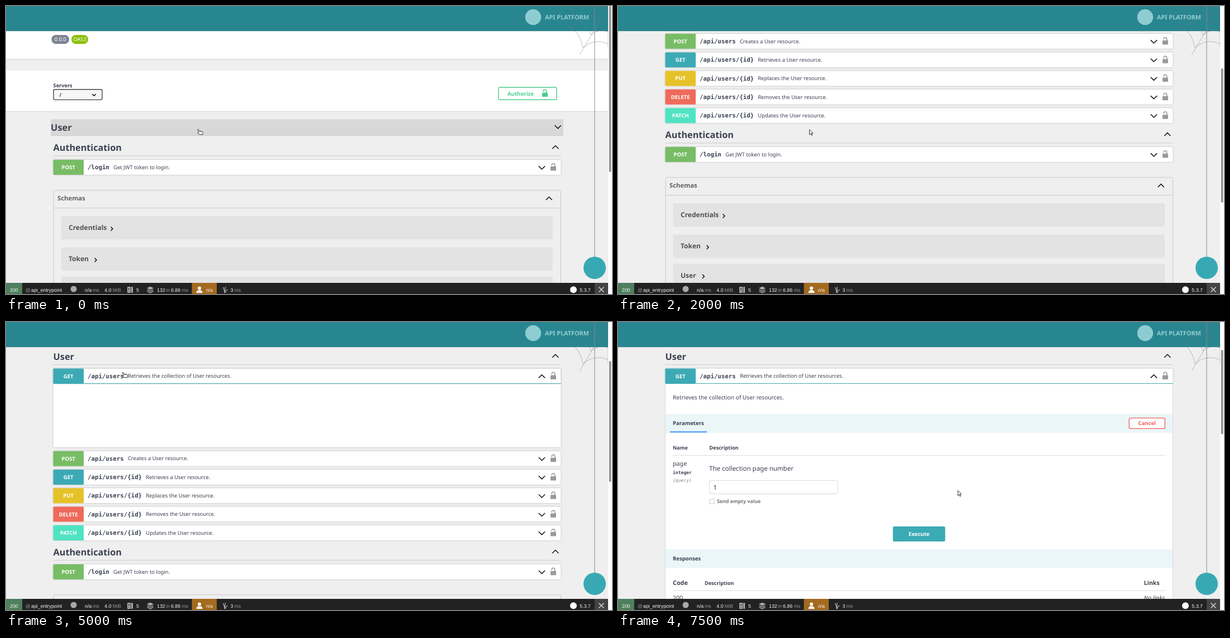
These frames come from a looping animation (1084x517 px, 8000 ms). An HTML page:

```html
<!DOCTYPE html>
<html lang="en">
<head>
<meta charset="utf-8">
<title>API docs</title>
<style>
html, body { margin: 0; width: 100%; height: 100%; overflow: hidden; background: #fff; }
svg { display: block; width: 1084px; height: 517px; }
text { font-family: "Noto Sans", sans-serif; fill: #3b4151; white-space: pre; text-rendering: geometricPrecision; }
.b { font-weight: 700; }
.i { font-style: italic; }
.m { font-family: "DejaVu Sans Mono", monospace; }
.mid { text-anchor: middle; }
#bar text { font-family: "Liberation Sans", Arial, sans-serif; font-size: 8.8px; fill: #f5f5f5; }
#bar .dim { fill: #999; }
.card { fill: #fff; filter: drop-shadow(0 .5px 1px rgba(0,0,0,.3)); }
</style>
</head>
<body>
<svg viewBox="0 0 1084 517">
  <rect width="1077" height="517" fill="#efefef"/>
  <g id="page"></g>
  <rect width="1077" height="45" fill="#288690"/>
  <path d="M0 45.3H1077" stroke="#000" stroke-opacity=".15" stroke-width=".7"/>
  <circle cx="943" cy="20" r="14.2" fill="#8dcdd2"/>
  <text x="964" y="24.4" class="b" font-size="10.8" style="fill:#93d0d4">API PLATFORM</text>
  <g id="web" fill="none" stroke="#6d7577" stroke-opacity=".5" stroke-width=".9"></g>
  <path d="M1053 0V452" stroke="#85898a" stroke-width="1"/>
  <circle cx="1053" cy="470" r="20" fill="#38a9b4"/>
  <rect x="1077" width="7" height="517" fill="#fcfcfc"/>
  <rect id="thumb" x="1078.8" width="3.6" rx="1.8" fill="#8f8f8f"/>
  <g id="bar"></g>
  <g id="cursor" stroke="#222" stroke-width=".9" stroke-linejoin="round" fill="#fff"></g>
</svg>
<script>
const $ = id => document.getElementById(id);
const colors = { GET: '#3caab5', POST: '#78bd65', PUT: '#e6c229', DELETE: '#ef6a5a', PATCH: '#50e3c2' };
const pitch = 33.33;

const text = (x, y, str, size = 9.45, cls = '', fill = '') =>
  `<text x="${x}" y="${y}" font-size="${size}" class="${cls}"${fill && ` style="fill:${fill}"`}>${str}</text>`;
const rect = (x, y, w, h, fill, extra = '') =>
  `<rect x="${x}" y="${y}" width="${w}" height="${h}" fill="${fill}" ${extra}/>`;
const path = (d, stroke, width = 1, fill = 'none') =>
  `<path d="${d}" fill="${fill}" stroke="${stroke}" stroke-width="${width}"/>`;
const hline = (x1, x2, y, stroke, width) => path(`M${x1} ${y}H${x2}`, stroke, width);
const shift = (y, body) => `<g transform="translate(0 ${y})">${body}</g>`;
const outline = (color, width = 1) => `rx="2.6" stroke="${color}" stroke-width="${width}"`;

function chevron(x, y, up, w = 5.6, h = 5.6, width = 1.5) {
  const s = up ? h / 2 : -h / 2;
  return path(`M${x - w} ${y + s}L${x} ${y - s}L${x + w} ${y + s}`, '#111', width);
}

function padlock(x, y, color) {
  return rect(x - 5, y - 1.5, 10, 7.5, color, 'rx="1"') +
    path(`M${x - 2.8} ${y - 3}v-1a2.8 2.8 0 0 1 5.6 0v3`, color, 1.5);
}

const badge = (x, w, str, fill) => rect(x, 52, w, 16, fill, 'rx="8"') +
  text(x + w / 2, 63.3, str, 9.3, 'mid', '#fff');

// Row centred on y = 0
function row(method, url, note, open) {
  const noteX = 146 + url.length * 6.47 + 7.2;
  return `<rect x="84.5" y="-13.5" width="908" height="27" rx="2" class="card"/>` +
    rect(84.5, -13.5, 54.5, 27, colors[method], 'rx="1.5"') +
    text(111.7, 3.5, method, 9.5, 'b mid', '#fff') +
    text(146, 3.6, url, 10.75, 'b m') + text(noteX, 3.2, note) +
    chevron(958.5, .6, open) + padlock(979, 0, '#999');
}

// Heading with its text centred on y = 0
function heading(name, open, hover) {
  const body = (hover ? rect(84.5, -14.5, 908, 29.3, '#d8d8d8') : '') +
    text(84.6, 5.8, name, 16.2, 'b') + hline(84.5, 992.5, 14.6, '#c9cacd', 1) +
    chevron(982.8, -.9, open);
  return hover ? `<g transform="translate(-5.385 0) scale(1.01)">${body}</g>` : body;
}

function intro() {
  return rect(0, 45, 1077, 50, '#fff') + hline(0, 1077, 95.5, '#d2d2d2', 1) +
    badge(81.3, 31.7, '0.0.0', '#7d8492') + badge(117, 30, 'OAS3', '#89bf04') +
    rect(0, 116, 1077, 73, '#fff') + hline(0, 1077, 189.5, '#d4d4d4', 1) +
    text(84.6, 146.4, 'Servers', 9.2, 'b') +
    rect(85, 149.8, 87, 18.6, '#f7f7f7', outline('#41444e', 1.4)) +
    text(95.3, 162.6, '/', 9.4, 'b') + chevron(157.5, 159.7, false, 3.2, 3.2, 1.5) +
    rect(881, 146, 104, 22.3, '#fff', outline('#49cc90', 1.4)) +
    text(897, 160.8, 'Authorize', 9.6, 'b', '#49cc90') + padlock(964, 157, '#49cc90');
}

function schemas() {
  const model = (y, name, arrow) => rect(98.5, y, 879.5, 42, '#e3e3e3', 'rx="2.5"') +
    text(112, y + 25, name, 12, 'b', '#505050') +
    path(`M${arrow - 1.8} ${y + 19.4}l3.4 3.5l-3.4 3.5`, '#111', 1.5);
  return rect(85, 330.8, 907.5, 600, 'none', outline('#c8c8c8')) +
    text(92, 349.2, 'Schemas', 11.3, 'b', '#606060') + chevron(971.3, 345.5, true) +
    hline(85, 992.5, 362.7, '#c8c8c8', 1) +
    model(377.2, 'Credentials', 189.3) + model(433.2, 'Token', 160.4) + model(485.6, 'User', 152.7);
}

function responses() {
  return rect(85, 377.5, 907.5, 33.5, '#eaf6f7') + text(98, 397.8, 'Responses', 9.55, 'b') +
    text(98, 442, 'Code', 10.8, 'b') + text(155, 441.6, 'Description', 9.1, 'b') +
    text(940.7, 442, 'Links', 10.6, 'b') + hline(98, 979, 452, '#d5d8dc', .9) +
    text(98, 468.3, '200', 10.6) + text(940.7, 468.3, 'No links', 10.6, 'i') +
    text(155, 480.8, 'User collection', 11.5);
}

// Opened operation, in stage coordinates
function details(editing) {
  const common = rect(84.5, 111, 908, 420, '#fff') +
    text(98, 139.4, 'Retrieves the collection of User resources.', 10.15) +
    rect(85, 165, 907.5, 34, '#eaf6f7') + text(98, 185.3, 'Parameters', 9.6, 'b') +
    rect(93, 196, 66, 2.6, '#61a9f7') +
    text(98, 228.7, 'Name', 9, 'b') + text(163.3, 228.7, 'Description', 9.1, 'b') +
    hline(98, 979, 239.4, '#d5d8dc', .9) +
    text(98, 258, 'page', 10.7) + text(98, 273, 'integer', 8.05, 'b m') +
    text(98, 286.6, '(query)', 8.05, 'i m', '#808080') +
    text(163, 267.3, 'The collection page number', 11.5);
  const form = editing
    ? rect(914.4, 172.4, 64, 19, '#fff', outline('#f0625b', 1.4)) +
      text(946.3, 185.2, 'Cancel', 9.5, 'b mid', '#f0625b') +
      rect(163.5, 284.5, 229.5, 24, '#fff', outline('#d9d9d9')) + text(170.5, 300.8, '1', 11.2, '', '#222') +
      rect(163.8, 318, 8.2, 8.2, '#fff', 'stroke="#ccc"') +
      text(177, 325.4, 'Send empty value', 8.8, 'b', '#73757d') +
      rect(491.7, 367, 93.6, 27, '#3caab5', 'rx="2.5"') + text(538.5, 384.1, 'Execute', 9.6, 'b mid', '#fff')
    : rect(902.5, 172.4, 76, 19, '#fbfdfd', outline('#858585', 1.4)) +
      text(940.4, 185.2, 'Try it out', 9.5, 'b mid') +
      text(163, 291, '<tspan class="i">Default value</tspan> : 1', 11.5) +
      rect(163.5, 308.3, 229.5, 24.5, '#fafafa', outline('#d9d9d9')) + text(170.5, 324.8, '1', 11.2, '', '#8a8a8a');
  return common + form + shift(editing ? 30.3 : 0, responses());
}

const routes = [
  ['GET', '/api/users', 'Retrieves the collection of User resources.'],
  ['POST', '/api/users', 'Creates a User resource.'],
  ['GET', '/api/users/{id}', 'Retrieves a User resource.'],
  ['PUT', '/api/users/{id}', 'Replaces the User resource.'],
  ['DELETE', '/api/users/{id}', 'Removes the User resource.'],
  ['PATCH', '/api/users/{id}', 'Updates the User resource.']
];

const CLOSED = 0, FLIPPED = 1, LISTED = 2, OPENING = 3, DETAILS = 4, EDITING = 5;

function page({ scroll, view }) {
  const listed = view >= LISTED, opening = view === OPENING;
  const extra = opening ? 114.8 : 0;
  const push = (listed ? pitch * 6 : 0) + extra;
  let out = intro() + shift(217.9, heading('User', view !== CLOSED, scroll === 0));
  if (view >= DETAILS) {
    out += shift(253, row(...routes[0], true)) + shift(scroll, details(view === EDITING)) +
      path('M84.5 266V700M992.5 266V700', '#d4d4d4', .8);
  } else {
    if (opening) out += '<rect x="84.5" y="240" width="908" height="141" class="card"/>';
    if (listed) routes.forEach((r, i) => {
      out += shift(253 + i * pitch + (i ? extra : 0), row(...r, opening && !i));
    });
    out += shift(push, shift(254.4, heading('Authentication', true)) +
      shift(289.6, row('POST', '/login', 'Get JWT token to login.')) + schemas());
  }
  if (view >= OPENING) out += hline(84.5, 992.5, 266.5, '#3caab5', 1);
  return shift(-scroll, out);
}

const step = (view, scroll, x, y, hand) => ({ view, scroll, x, y, hand });
const steps = [
  step(CLOSED, 0, 342, 220.8, true),
  step(FLIPPED, 0, 342, 220.8, true),
  step(LISTED, 0, 342, 220.8, true),
  step(LISTED, 106, 342, 220.8, true),
  step(LISTED, 223, 342.5, 221.8),
  step(LISTED, 234, 318, 222, true),
  step(LISTED, 234, 308, 251, true),
  step(LISTED, 156, 297.5, 221, true),
  step(LISTED, 156, 266, 124, true),
  step(LISTED, 156, 214.5, 91, true),
  step(OPENING, 156, 207.5, 89.7, true),
  step(DETAILS, 156, 534.5, 171.3),
  step(DETAILS, 156, 793.5, 197),
  step(DETAILS, 156, 890, 180.6),
  step(EDITING, 156, 940, 178, true),
  step(EDITING, 156, 608, 302.4)
];

const thumbs = { [CLOSED]: [0, 298], [FLIPPED]: [0, 298], [OPENING]: [70, 217], [DETAILS]: [50, 155], [EDITING]: [50, 151.5] };
const arrowShape = '<path d="M0 0V9.2L2.2 7.2L3.7 10.6L5.1 10L3.6 6.7H6.4Z"/>';
const handShape = '<path d="M.6 1.2C1.2.1 2.2.6 2.6 1.4L4 3.8L8.2 4.2Q10 4.6 10 6.3V9.8H3.6L1 7Q.9 5.8 2.4 6.2L3.1 6.4Z"/>' +
  '<path d="M5 5.8V4M7 5.8V4.2" stroke-width=".6"/>';

function draw(state) {
  $('page').innerHTML = page(state);
  const [y, h] = thumbs[state.view] || [state.scroll * .502, 241];
  $('thumb').setAttribute('y', y);
  $('thumb').setAttribute('height', h);
  $('cursor').innerHTML = state.hand ? handShape : arrowShape;
  $('cursor').setAttribute('transform', `translate(${state.x} ${state.y})`);
}

$('web').innerHTML = '<path d="M1077 2L978 0M1077 2L1002 42M1077 2L1026 88M1077 2V74' +
  'M985 0Q990 22 1008 39Q1027 46 1032 75Q1053 57 1077 68' +
  'M1012 0Q1014 18 1027 29Q1042 36 1046 52Q1060 40 1077 46' +
  'M1038 0Q1039 9 1047 18Q1056 23 1060 31Q1068 23 1077 26"/>';

function debugBar() {
  const label = (x, str, dim) => text(x, 512.6, str, 8.8, dim ? 'dim' : '');
  const icon = '#aaa';
  return rect(0, 497, 1077, 20, '#222') + rect(0, 497, 29, 20, '#4f805d') +
    rect(332.5, 497, 44.5, 20, '#a46a1f') + rect(1053, 497, 24, 20, '#444') +
    label(7, '200') + label(35, '@', 1) + label(45, 'api_entrypoint') +
    `<circle cx="121" cy="508" r="5.5" fill="${icon}"/>` +
    label(141, 'n/a') + label(155, 'ms', 1) + label(176.3, '4.0') + label(190.7, 'MiB', 1) +
    rect(217, 504, 6, 11, icon, 'rx="1"') + rect(224, 504, 3, 11, icon, 'rx="1"') +
    path('M220 506v4M220 511.5v1.5', '#222', 1.3) + label(233, '5') +
    path('M252 506.5l6-3l6 3l-6 3Z', 'none', 0, icon) +
    path('M252.5 509.2l5.5 2.8l5.5-2.8M252.5 512l5.5 2.8l5.5-2.8', icon, 1.5) +
    label(270, '132') + label(286, 'in', 1) + label(295, '6.86') + label(314.5, 'ms', 1) +
    '<circle cx="346" cy="506.5" r="3" fill="#fff"/>' +
    path('M340.5 515q0-5 5.5-5t5.5 5Z', 'none', 0, '#fff') + label(357.7, 'n/a') +
    path('M391 515q0-6-3-10M391.5 515q0-7 1-11M392 515q1-4 4.5-6', icon, 1.3) +
    label(401.5, '3') + label(408.5, 'ms', 1) +
    '<circle cx="1015" cy="509.3" r="6" fill="#fff"/>' + label(1026.3, '5.3.7') +
    path('M1060.5 504.5l9 9m0-9l-9 9', '#ccc', 1.6);
}
$('bar').innerHTML = debugBar();

let shown = -1;
function tick() {
  const index = Math.floor(performance.now() % 8000 / 500);
  if (index !== shown) draw(steps[shown = index]);
  requestAnimationFrame(tick);
}
tick();
</script>
</body>
</html>
```
